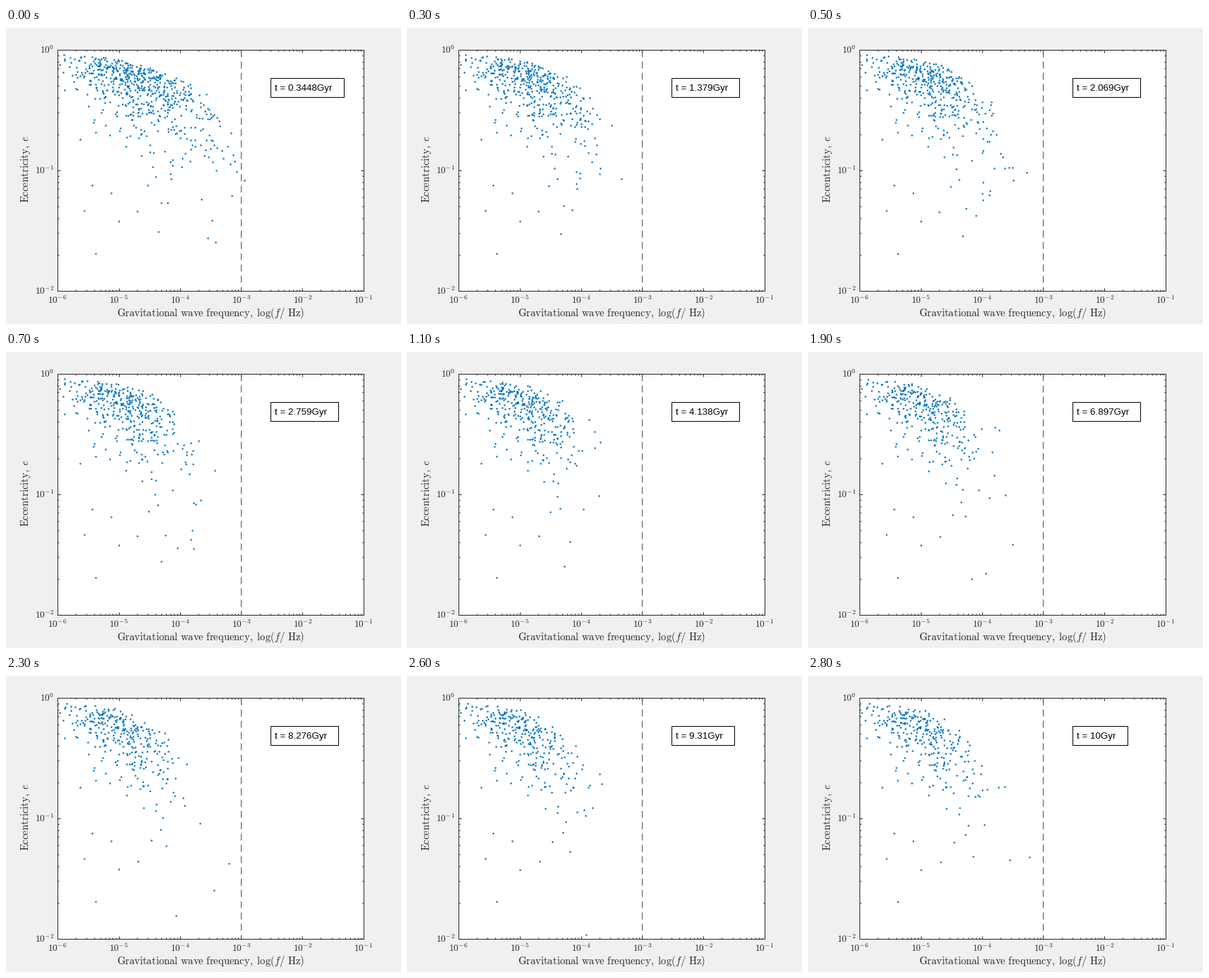
Animation, 560 px wide and 420 px high, one loop 2.9 s. Source, as a matplotlib script:

```python
import numpy as np
import matplotlib.pyplot as plt
from matplotlib.animation import FuncAnimation
from matplotlib.patches import Rectangle

W, H, DPI = 560, 420, 100
PX = 72 / DPI                      # points per pixel
FRAMES, STEP = 29, 10 / 29         # step in Gyr
LEFT, RIGHT, TOP, BOTTOM = 73, 507, 31, 373
DECADE_X = (RIGHT - LEFT) / 5
DECADE_Y = (BOTTOM - TOP) / 2
INK, BLUE = "#262626", "#0072bd"

plt.rcParams["mathtext.fontset"] = "cm"
plt.rcParams["font.family"] = "Liberation Sans"


# --- orbital decay: shared curves over eccentricity --------------------------

ECC = np.linspace(1e-4, 0.985, 20000)
DE = ECC[1] - ECC[0]
ROUND = 1 - ECC**1.5
DRAG = 1 + 121 / 304 * ECC**2
POWER = 1 + 73 / 24 * ECC**2 + 37 / 96 * ECC**4
LOG_G = 12 / 19 * (np.log(ECC) + np.cumsum((POWER / (ROUND * DRAG) - 1) / ECC) * DE)
G4 = np.exp(4 * LOG_G)
LIFE = G4[0] * 19 / 48 + np.cumsum(G4 * ROUND**2.5 / (ECC * DRAG)) * DE
LIFE_SCALE = 1.15 * 48 / 19        # Gyr, circular orbit at 1e-4 Hz


def evolve(x, y, dt):
    """Move pixel positions along their decay tracks by dt Gyr."""
    freq = 10 ** ((x - LEFT) / DECADE_X - 2)
    ecc = 10 ** ((TOP - y) / DECADE_Y)
    track = freq ** (-8 / 3) / np.interp(ecc, ECC, G4)
    left = np.interp(ecc, ECC, LIFE) - dt / (LIFE_SCALE * track)
    alive = left > LIFE[0]
    ecc = np.interp(left[alive], LIFE, ECC)
    freq = (track[alive] * np.interp(ecc, ECC, G4)) ** (-3 / 8)
    return (LEFT + DECADE_X * (np.log10(freq) + 2),
            TOP - DECADE_Y * np.log10(ecc))


# --- population at the first step --------------------------------------------

# isolated, nearly circular binaries
LONERS = [(127, 320), (111, 259), (186, 260), (160, 274), (149, 234), (122, 223),
          (220, 248), (212, 211), (233, 207), (338, 216), (292, 273), (320, 238)]


def make_population():
    rng = np.random.default_rng(5)
    # crowd hanging below a curved upper edge
    u = rng.normal(115, 54, 600)
    u = u[(u > -20) & (u < 230)]
    edge = 37 + 67 * (np.maximum(u, 0) / 228) ** 2.2
    y = edge + rng.gamma(1.3, 18 + 0.08 * np.maximum(u, 0))
    # a few about to merge
    late_x = rng.uniform(275, 332, 14)
    late_y = rng.uniform(110, 180, 14) + 0.8 * (late_x - 275)
    lone_x, lone_y = np.array(LONERS, float).T
    return (np.concatenate([u + 75, late_x, lone_x]),
            np.concatenate([y, late_y, lone_y]))


START = make_population()


def dots_at(k):
    x, y = evolve(*START, k * STEP)
    shown = (x >= LEFT) & (x <= RIGHT) & (y >= TOP) & (y <= BOTTOM)
    return x[shown], y[shown]


# --- static stage ------------------------------------------------------------

fig = plt.figure(figsize=(W / DPI, H / DPI), dpi=DPI, facecolor="#f0f0f0")
ax = fig.add_axes([0, 0, 1, 1])
ax.set(xlim=(0, W), ylim=(H, 0))
ax.axis("off")


def line(x, y, **style):
    ax.plot(x, y, **{"color": INK, "lw": PX, "solid_capstyle": "butt", **style})


def label(x, y, text, px, **style):
    return ax.text(x, y, text, fontsize=px * PX,
                   **{"color": INK, "va": "baseline", **style})


def tick_x(x, size):
    x = round(x)
    line([x, x], [BOTTOM, BOTTOM - size], zorder=3)
    line([x, x], [TOP, TOP + size], zorder=3)


def tick_y(y, size):
    y = round(y)
    line([LEFT, LEFT + size], [y, y], zorder=3)
    line([RIGHT, RIGHT - size], [y, y], zorder=3)


ax.add_patch(Rectangle((LEFT, TOP), RIGHT - LEFT, BOTTOM - TOP,
                       fc="white", ec=INK, lw=PX, zorder=1))
minors = np.log10(np.arange(2, 10))
for i in range(6):
    x = LEFT + i * DECADE_X
    tick_x(x, 4)
    label(x, 391, f"$10^{{{i - 6}}}$", 13.33, ha="center")
    if i < 5:
        for m in minors:
            tick_x(x + m * DECADE_X, 2)
for i in range(3):
    y = TOP + i * DECADE_Y
    tick_y(y, 4)
    label(68, y + 5, f"$10^{{{-i}}}$", 13.33, ha="right")
    if i:
        for m in minors:
            tick_y(y - m * DECADE_Y, 2)

label(289.5, 409, r"$\mathrm{Gravitational\ wave\ frequency,\ log(}f/\mathrm{\ Hz)}$",
      14.67, ha="center")
label(32, 200, r"$\mathrm{Eccentricity,\ }e$", 14.67, ha="center",
      rotation=90, rotation_mode="anchor")
line([333, 333], [TOP, BOTTOM], color="#4d4d4d", dashes=(10, 6),
     dash_capstyle="butt", zorder=2)

# --- moving parts ------------------------------------------------------------

dots, = ax.plot([], [], "o", color=BLUE, ms=2.5 * PX, mew=0, zorder=4)
box = Rectangle((375, 71), 104, 27, fc="white", ec="black", lw=PX, zorder=5)
ax.add_patch(box)
clock = label(381, 89, "", 13.33, color="black", zorder=6)


def draw(k):
    dots.set_data(*dots_at(k))
    value = f"{(k + 1) * STEP:.4g}"
    clock.set_text(f"t = {value}Gyr")
    points = value.count(".")
    box.set_width(round(62.9 + 7.41 * (len(value) - points) + 3.7 * points))
    return dots, box, clock


anim = FuncAnimation(fig, draw, frames=FRAMES, interval=100, repeat=True)
plt.show()
```
